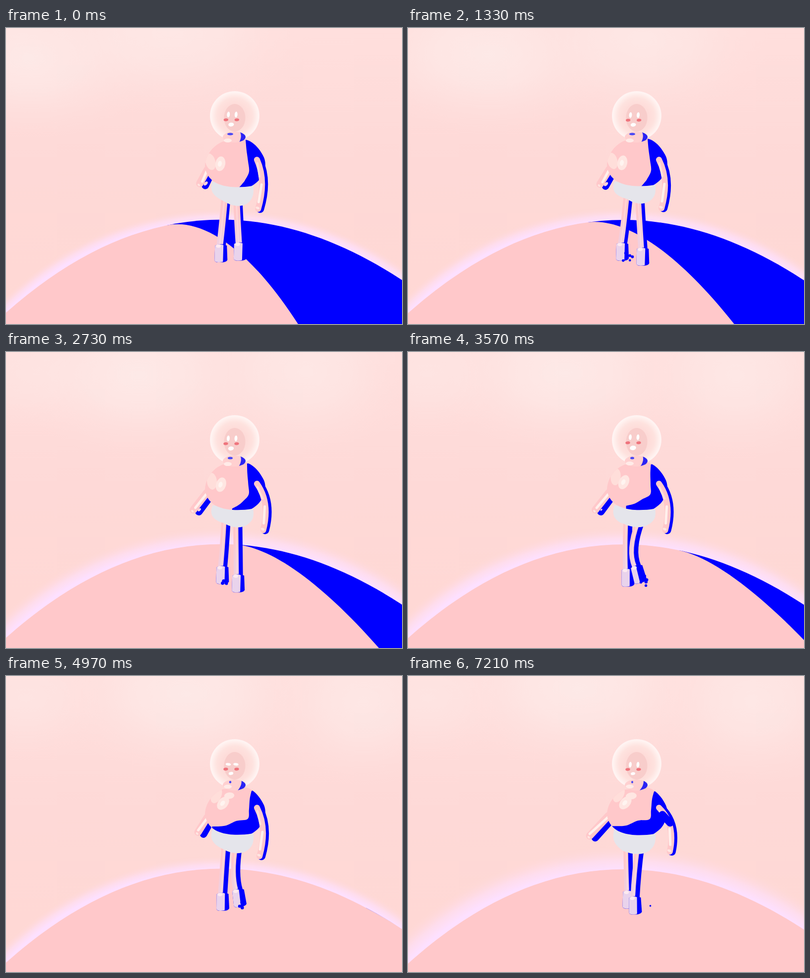
Animation of 800x600 px, one loop 7280 ms. Source, as an HTML page:

```html
<!DOCTYPE html>
<html lang="en">
<head>
<meta charset="utf-8">
<title>Planet walk</title>
<style>
html, body { margin: 0; width: 100%; height: 100%; overflow: hidden; background: #ffd9d7; }
svg { display: block; width: 100vw; height: 100vh; }
</style>
</head>
<body>
<svg id="stage" viewBox="0 0 800 600"></svg>
<script>
const STEP = 70, LOOP = 7280, STRIDE = 1610, TURN = 2 * Math.PI;
const BLUE = '#0000ff', SKIN = '#ffc8ca', PALE = '#ffe6e2', LAVENDER = '#e9d3ec';

const lerp = (a, b, u) => a + (b - a) * u;
const blend = (a, b, u) => a.map((v, i) => lerp(v, b[i], u));
const clamp = v => Math.max(0, Math.min(1, v));
const ease = v => { const u = clamp(v); return u * u * (3 - 2 * u); };
function random(n) {
  const v = Math.sin(n * 127.1 + 3.7) * 43758.5453;
  return v - Math.floor(v);
}

const path = (d, fill, extra = '') => `<path d="${d}" fill="${fill}" ${extra}/>`;
const line = (d, color, width, extra = '') =>
  `<path d="${d}" fill="none" stroke="${color}" stroke-width="${width}" stroke-linecap="round" ${extra}/>`;
const oval = (x, y, rx, ry, fill, turn = 0, extra = '') =>
  `<ellipse cx="${x}" cy="${y}" rx="${rx}" ry="${ry}" fill="${fill}" transform="rotate(${turn} ${x} ${y})" ${extra}/>`;
const group = (inner, attrs) => `<g ${attrs}>${inner}</g>`;

// Catmull-Rom curve through the points
function smooth(points) {
  const at = i => points[Math.max(0, Math.min(points.length - 1, i))];
  let d = `M${points[0]}`;
  for (let i = 0; i < points.length - 1; i++) {
    const [a, b, c, e] = [at(i - 1), at(i), at(i + 1), at(i + 2)];
    d += `C${b[0] + (c[0] - a[0]) / 6} ${b[1] + (c[1] - a[1]) / 6} ${c[0] - (e[0] - b[0]) / 6} ${c[1] - (e[1] - b[1]) / 6} ${c}`;
  }
  return d;
}

// The horizon is one cubic with evenly spaced control points, so y follows x directly.
function makeHill(age) {
  const [a, b, c, d] = [577 + 6 * age, 340 + 3 * age, 336 + 3 * age, 511 + 3 * age];
  return {
    path: `M0 ${a}C266.7 ${b} 533.3 ${c} 800 ${d}V600H0Z`,
    y(x) {
      const u = x / 800, v = 1 - u;
      return v * v * v * a + 3 * v * v * u * b + 3 * v * u * u * c + u * u * u * d;
    }
  };
}

function nightPath(hill, age) {
  const sx = 325 + 800 * age ** 1.8, ex = 590 + 530 * age ** 1.2, sy = hill.y(sx);
  const reach = (ex - sx) / 4, slope = (hill.y(sx + 1) - sy);
  return `M${sx} ${sy}C${sx + reach} ${sy + slope * reach} ${lerp(sx, ex, .6)} ${lerp(sy, 600, .18 + .5 * age)} ${ex} 600L1500 640V200H${sx}Z`;
}

function background(age, spread) {
  const hill = makeHill(age), radius = 602, outer = radius + 23 + 25 * spread, edge = radius / outer;
  const cy = 992 + 3 * age, drift = Math.sin(2 * age);
  const cloud = (x, y, rx, ry, o) => oval(x, y, rx, ry, 'url(#cloud)', 0, `opacity="${o}"`);
  return `<defs>
    <linearGradient id="sky" x2="0" y2="1"><stop stop-color="#ffdfdd"/><stop offset=".45" stop-color="#fed9d7"/><stop offset="1" stop-color="#ffd8d4"/></linearGradient>
    <radialGradient id="cloud"><stop stop-color="#fdebe9"/><stop offset=".4" stop-color="#fdeae8" stop-opacity=".7"/><stop offset="1" stop-color="#fee0de" stop-opacity="0"/></radialGradient>
    <radialGradient id="halo" gradientUnits="userSpaceOnUse" cx="436" cy="${cy}" r="${outer}">
      <stop offset="${edge}" stop-color="#fde0ff"/><stop offset="${lerp(edge, 1, .4)}" stop-color="#fedff7" stop-opacity=".7"/><stop offset="1" stop-color="#fed9dd" stop-opacity="0"/></radialGradient>
    <radialGradient id="glass"><stop offset=".35" stop-color="#fdd8d5" stop-opacity=".65"/><stop offset=".72" stop-color="#fee4e0" stop-opacity=".8"/><stop offset=".95" stop-color="#fff6f4" stop-opacity=".9"/><stop offset="1" stop-color="#fffafa" stop-opacity=".75"/></radialGradient>
    <linearGradient id="limb" gradientUnits="userSpaceOnUse" x1="0" y1="375" x2="0" y2="430"><stop stop-color="${SKIN}"/><stop offset="1" stop-color="#f1cfe0"/></linearGradient>
    <clipPath id="hill"><path d="${hill.path}"/></clipPath>
    <clipPath id="body"><path d="${TORSO}"/></clipPath>
    <clipPath id="collar"><ellipse cx="461" cy="221" rx="23" ry="11"/></clipPath>
  </defs>
  <rect width="800" height="600" fill="url(#sky)"/>
  ${cloud(50 + 320 * drift, 60 - 35 * age, 270, 165, .85)}
  ${cloud(330 + 400 * drift, 10 + 45 * drift, 290 - 90 * drift, 170, .7)}
  ${cloud(40, 45, 180, 130, .45 * ease(age * 2))}
  <circle cx="436" cy="${cy}" r="${outer}" fill="url(#halo)"/>${path(hill.path, SKIN)}
  ${path(nightPath(hill, age), BLUE, 'clip-path="url(#hill)"')}`;
}

// Each ankle circles around its centre; the knee bends and the boot tips while the foot is behind.
function leg({ hip, cx, cy, rx, ry, offset, flex }, walk, shade) {
  const angle = offset - walk, bend = flex * Math.max(0, Math.sin(walk));
  const ax = cx + rx * Math.cos(angle), ay = cy + ry * Math.sin(angle);
  const curve = dx => `M${hip + dx} 346Q${(hip + ax) / 2 - 18 * bend + dx} 402 ${ax + dx} ${ay}`;
  const right = 5 - 6 * bend;
  const boot = path('M-12 0Q0 -6 12 0L13 29Q12 33 4 34L-8 34Q-13 33 -13 29Z', BLUE)
    + path(`M-12 0Q-4 -5 ${right} -1L${right - 1} 33Q-6 35 -10 33Q-13 32 -13 29Z`, LAVENDER)
    + oval(-5, 1, 5, 3.5, '#fdeaf0');
  return line(curve(2), BLUE, 15, 'stroke-linecap="butt"')
    + line(curve(-shade / 2), 'url(#limb)', 18 - shade)
    + line(curve(-3), '#ffe0e2', 3, 'stroke-opacity=".55"')
    + group(boot, `transform="translate(${ax} ${ay}) rotate(${-16 * bend})"`);
}

const RIGHT_LEG = { hip: 468, cx: 466, cy: 444, rx: 9, ry: 10, offset: -.7, flex: 1 };
const LEFT_LEG = { hip: 444, cx: 440, cy: 439, rx: 7.5, ry: 3, offset: -.7 + Math.PI, flex: .1 };

function dust(t) {
  let out = '';
  for (let i = 0; i < 10; i++) {
    const x = i % 2 ? 440 : 474, delay = (i % 2 ? .6 : .02) + random(i) * .17;
    const age = (t / STRIDE - delay + 1) % 1 / .36;
    if (t < delay * STRIDE || age > 1) continue;
    const r = 3.6 - 2 * age, reach = Math.sqrt(age);
    out += oval(x + (random(i + 9) - .35) * 36 * reach, 466 + (random(i + 20) - .6) * 28 * reach, r, r, BLUE);
  }
  return out;
}

function pelvis(walk, bob) {
  const low = 358 + 3 * bob, tilt = 4 + 4 * Math.cos(walk + .8);
  return path(`M417 311C411 328 416 ${343 - tilt / 2} ${434 + tilt} ${low - 6 - tilt / 2}C${450 + tilt} ${low + 1} ${470 + tilt / 2} ${low + 2} ${482 + tilt / 2} ${low - 4}C502 ${low - 14} 501 330 499 315Z`, '#e5e5eb');
}

const TORSO = 'M438 230C417 238 402 260 402 281C404 298 415 311 432 317C450 324 478 323 496 320C508 313 518 303 520 290C526 281 524 269 521 262C512 243 498 229 484 226Z';
const SHADE_EARLY = [[484, 226], [486, 248], [489, 270], [491, 291], [483, 308], [477, 316], [470, 324]];
const SHADE_LATE = [[497, 234], [493, 250], [491, 272], [488, 290], [464, 293], [440, 303], [412, 304]];

function torso(sun) {
  const edge = SHADE_EARLY.map((p, i) => blend(p, SHADE_LATE[i], sun));
  const [fx, fy, turn] = blend([433, 275, 10], [439, 257, 42], sun);
  const [sx, sy, sideTurn] = blend([413, 271, -15], [426, 240, 28], sun);
  const top = ease(sun * 2 - 1);
  return path(TORSO, SKIN) + group(
    path(smooth(edge) + 'V345H545V215Z', BLUE)
    + oval(sx, sy, 10, 17, '#ffdeda', sideTurn) + oval(451, 243, 11 * top, 7 * top, PALE, -6)
    + oval(fx, fy, 10, 15, PALE, turn) + oval(fx - 1, fy, 4, 6, '#fff4f0', turn), 'clip-path="url(#body)"');
}

function leftArm(s, sun) {
  const x = 392 - 25 * s, y = 315 + 9 * s, top = [407 - 2 * s, 287 - 4 * s], spot = 1 - sun;
  return line(`M${top[0] + 8} ${top[1] + 6}L${x + 11} ${y + 4}`, BLUE, 15)
    + line(`M${top}L${x} ${y}`, SKIN, 15)
    + line(`M${top[0] - 2} ${top[1] + 4}L${x + 5 * spot} ${y - 4}`, '#fff0ec', 5)
    + oval(x + 12, y, 5 * spot, 3 * spot, '#ffd5d9', -45)
    + oval(x - 2, y + 3, 3, 2, PALE, 45);
}

function rightArm(s, age) {
  const hx = 511 + 20 * s, hy = 367 - 11 * s, cx = 528 + 15 * s, cy = 310 - 10 * s;
  const ex = (509 + 2 * cx + hx) / 4, ey = (267 + 2 * cy + hy) / 4;
  const curve = dx => `M${509 + dx} 267Q${cx + dx} ${cy} ${hx + dx} ${hy}`;
  const gap = ease(age * 14 - 12.4) * s;
  return line(curve(2), BLUE, 16) + line(curve(-2), SKIN, 12)
    + line(`M508 274L${ex - 7} ${ey - 12}`, '#ffe0dc', 4)
    + line(`M514 281L${ex - 2} ${ey - 8}`, BLUE, 15, `stroke-linecap="butt" opacity="${gap}"`)
    + line(`M${ex - 3} ${ey + 4}L${hx - 1} ${hy - 14}`, '#fff0ec', 5)
    + oval(hx - 3, hy - 2, 4, 2.5, PALE, 20);
}

function head(t, sun) {
  const nod = Math.cos(TURN * (t - 1960) / 2700), look = 6 * Math.exp(-(((t - 700) / 400) ** 2));
  const blink = Math.abs(t - 4970) < 140, eye = blink ? [5.2, 2.6] : [2.9, 5.8];
  const collar = oval(461, 221, 23, 11, '#ffd0d0')
    + group(path(`M${471 + sun * 4} 208Q479 ${218 + sun * 3} ${470 - sun * 4} 234H490V208Z`, '#2a24f4')
      + oval(453, 215, 6 - 4 * sun, 2.5, '#4a48f4'), 'clip-path="url(#collar)"')
    + oval(448, 228 - sun * 4, 8, 4, '#ffebe8');
  const face = oval(462, 182, 21.5, 28, '#f8cdcb')
    + [449, 464.5].map(x => oval(x + look, 176 + 4 * nod, ...eye, '#fff', 5)).join('')
    + [444, 466].map(x => oval(x + look * 1.4, 186.5 + 3 * nod, 4.7, 2.9, '#ef747d', -3)).join('')
    + oval(454.5 + look * 1.2, 196 + 2 * nod, 5.5 - nod, 3.8 - nod, '#fff', -8);
  return `<circle cx="462" cy="178" r="50" fill="url(#glass)"/>` + collar + face;
}

function scene(t) {
  const age = t / LOOP, walk = TURN * (t % STRIDE) / STRIDE;
  const spread = .5 - .5 * Math.cos(walk + TURN / 23);
  const bob = Math.cos(2 * walk), sun = ease((t - 1400) / 4300);
  const shade = lerp(5, 8.5, clamp(t / 3500));
  return background(age, spread) + leftArm(spread, sun)
    + leg(LEFT_LEG, walk, shade) + leg(RIGHT_LEG, walk, shade) + dust(t)
    + pelvis(walk, bob)
    + group(torso(sun), `transform="translate(0 ${1.2 * bob - 1})"`)
    + rightArm(spread, age) + head(t, sun);
}

const stage = document.getElementById('stage');
const start = performance.now();
let shown = -1;
function tick() {
  const t = Math.floor(((performance.now() - start) % LOOP) / STEP) * STEP;
  if (t !== shown) stage.innerHTML = scene(shown = t);
  requestAnimationFrame(tick);
}
tick();
</script>
</body>
</html>
```
